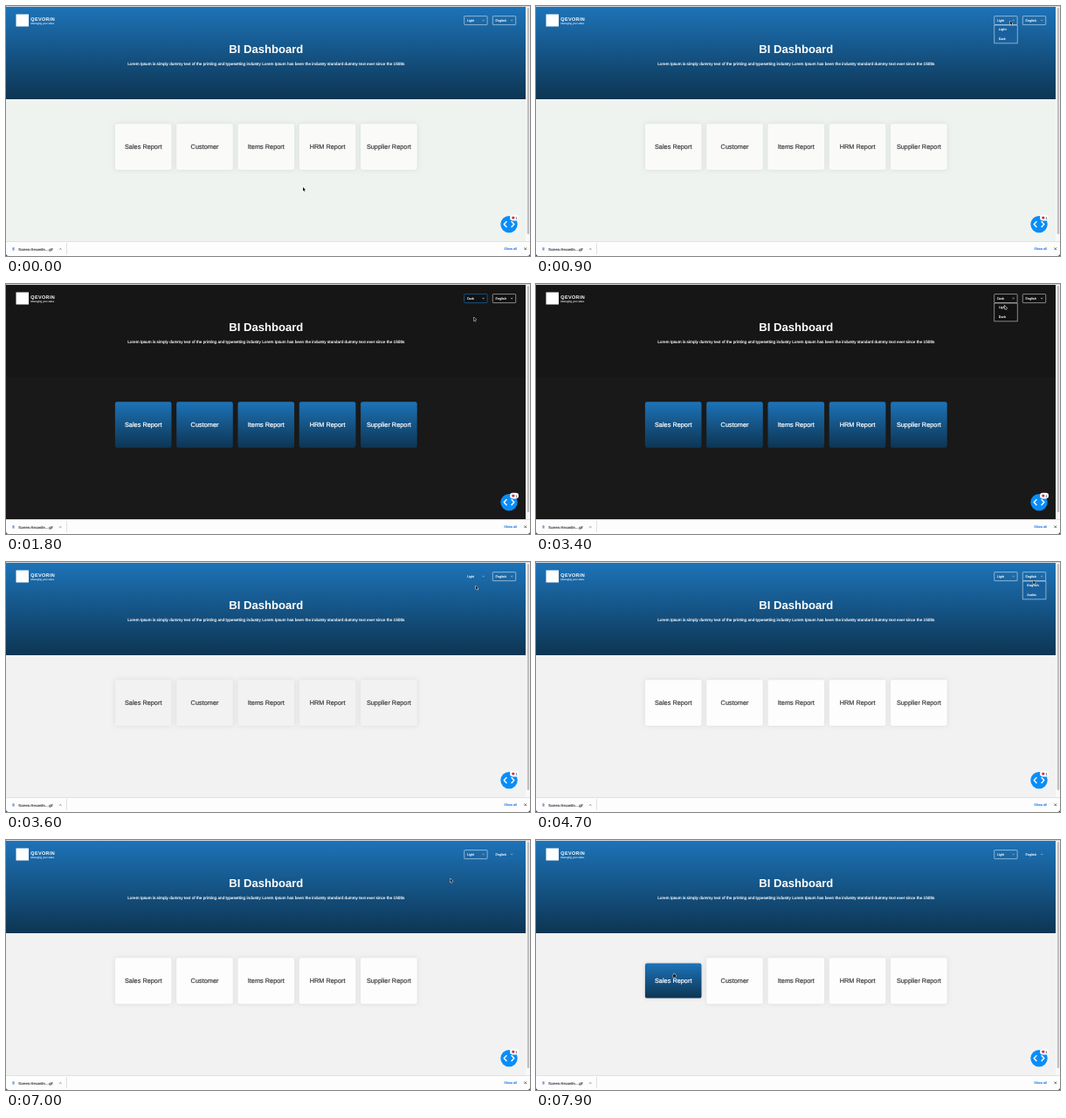
Animation, 600 px wide and 287 px high, one loop 8 s. Source, as an HTML page with a canvas:

```html
<!DOCTYPE html>
<html lang="en">
<head>
<meta charset="utf-8">
<title>BI Dashboard</title>
<style>
html, body { margin: 0; width: 100%; height: 100%; overflow: hidden; background: #fff; }
canvas { display: block; width: 600px; height: 287px; }
</style>
</head>
<body>
<canvas id="stage"></canvas>
<script>
const LOOP = 8000, STEP = 100;
const canvas = document.getElementById('stage');
const ctx = canvas.getContext('2d');
const ratio = window.devicePixelRatio || 1;
canvas.width = 600 * ratio;
canvas.height = 287 * ratio;

const LATIN = '"Liberation Sans", Arial, sans-serif';
const ARABIC = '"Noto Sans Arabic", "DejaVu Sans", sans-serif';

const words = {
  en: {
    title: 'BI Dashboard',
    sub: 'Lorem Ipsum is simply dummy text of the printing and typesetting industry Lorem Ipsum has been the industry standard dummy text ever since the 1500s',
    cards: ['Sales Report', 'Customer', 'Items Report', 'HRM Report', 'Supplier Report']
  },
  ar: {
    title: 'لوحة معلومات الأعمال',
    sub: 'لوريم إبسوم هو ببساطة نص شكلي في صناعة الطباعة والتنضيد ، كان لوريم إبسوم هو النص الوهمي القياسي في الصناعة منذ القرن الخامس عشر الميلادي',
    cards: ['تقرير المبيعات', 'تقرير العملاء', 'تقرير العنصر', 'تقرير الموظفين', 'تقرير الموردين']
  }
};

// Pointer stops: time, x, y; equal neighbours are rests.
const path = [
  [0, 340, 208], [400, 340, 208], [500, 431, 164], [800, 431, 164],
  [900, 543, 17], [1000, 543, 17], [1500, 535.5, 38], [2900, 535.5, 38],
  [3000, 539, 18], [3100, 539, 18], [3400, 536.5, 24.5], [3500, 536.5, 24.5],
  [3600, 538, 27], [3800, 538, 27], [4400, 570, 17], [4600, 570, 17],
  [5100, 566, 37.5], [5800, 566, 37.5], [6200, 571, 17],
  [6600, 567, 26], [6900, 567, 26], [7600, 158, 153], [LOOP, 158, 153]
];

const within = (t, from, to) => t >= from && t < to;

function pointer(t) {
  const i = Math.max(1, path.findIndex(p => p[0] >= t));
  const [t0, x0, y0] = path[i - 1], [t1, x1, y1] = path[i];
  const k = (t - t0) / (t1 - t0);
  return { x: x0 + (x1 - x0) * k, y: y0 + (y1 - y0) * k };
}

// A hairline stroke gives the type a slightly sturdier weight.
function text(str, x, y, size, color, align = 'left', weight = '', family = LATIN) {
  ctx.font = `${weight} ${size}px ${family}`;
  ctx.textAlign = align;
  ctx.direction = family === ARABIC ? 'rtl' : 'ltr';
  ctx.fillStyle = ctx.strokeStyle = color;
  ctx.fillText(str, x, y);
  if (weight) return;
  ctx.lineWidth = size * .03;
  ctx.strokeText(str, x, y);
}

function rect(x, y, w, h, color) {
  ctx.fillStyle = color;
  ctx.fillRect(x, y, w, h);
}

function line(points, color, width) {
  ctx.beginPath();
  points.forEach(([x, y]) => ctx.lineTo(x, y));
  ctx.strokeStyle = color;
  ctx.lineWidth = width;
  ctx.stroke();
}

function disc(x, y, r, color) {
  ctx.beginPath();
  ctx.arc(x, y, r, 0, Math.PI * 2);
  ctx.fillStyle = color;
  ctx.fill();
}

function blue(y0, y1) {
  const g = ctx.createLinearGradient(0, y0, 0, y1);
  g.addColorStop(0, '#1d73b8');
  g.addColorStop(1, '#0d3553');
  return g;
}

function rounded(x, y, w, h, r) {
  ctx.beginPath();
  ctx.roundRect(x, y, w, h, r);
}

function card(i, t, s) {
  const p = pointer(t), x = 124.9 + 70.3 * i;
  const hot = within(p.x, x, x + 64.6) && within(p.y, 135, 188);
  const h = hot ? 40 : 52.6, y = 161.6 - h / 2;
  const vivid = s.dark || hot;
  ctx.save();
  if (!s.dark) {
    ctx.shadowColor = 'rgba(0,0,0,.1)';
    ctx.shadowBlur = 5 * ratio;
  }
  rounded(x, y, 64.6, h, 2.2);
  ctx.fillStyle = vivid ? blue(y, y + h) : s.card;
  ctx.fill();
  ctx.restore();
  const ar = s.lang === 'ar';
  text(words[s.lang].cards[i], x + 32.3, ar ? 163.4 : 164.2, ar ? 6.4 : 7.35,
    vivid ? '#fff' : '#404244', 'center', '', ar ? ARABIC : LATIN);
}

function select(x, options, value, state, dark) {
  const open = state === 'open';
  const edge = state === 'focus' ? '#1d6cab' : 'rgba(255,255,255,.7)';
  rounded(x, 11.6, 26.4, 10, .8);
  if (dark) { ctx.fillStyle = '#111'; ctx.fill(); }
  ctx.strokeStyle = edge;
  ctx.lineWidth = .7;
  ctx.stroke();
  text(value, x + 3.2, 17.8, 3.75, '#fff');
  const cx = x + 21.9, d = open ? -.8 : .8;
  line([[cx - 1.2, 16.5 - d / 2], [cx, 16.5 + d / 2], [cx + 1.2, 16.5 - d / 2]],
    dark ? '#fff' : 'rgba(255,255,255,.7)', .6);
  if (!open) return;
  rect(x, 22, 26.6, 20.8, dark ? '#111' : '#19619d');
  ctx.strokeStyle = edge;
  ctx.lineWidth = .7;
  ctx.strokeRect(x, 22, 26.6, 20.8);
  options.forEach((o, i) =>
    text(o, x + 5, 28.4 + i * 10.3, 3.75, '#fff', 'left', o === value ? 'bold' : ''));
}

function header(s) {
  rect(0, 0, 595, 107, s.dark ? '#161616' : blue(1, 107));
  rect(11.5, 9.5, 14.5, 14, '#fff');
  ctx.letterSpacing = '.35px';
  text('QEVORIN', 28.3, 17, 5.5, '#fff', 'left', 'bold');
  ctx.letterSpacing = '0px';
  text('Managing your sales', 28.5, 21, 2.9, '#dce8f2');

  const w = words[s.lang];
  if (s.lang === 'ar') {
    text(w.title, 297.8, 51.7, 12.4, '#fff', 'center', '', ARABIC);
    text(w.sub, 297.6, 68, 4.17, '#fff', 'center', '', ARABIC);
  } else {
    text(w.title, 297.8, 53.8, 13.1, '#fff', 'center', 'bold');
    text(w.sub, 297.8, 68.1, 4.69, '#fff', 'center');
  }
}

function widget() {
  disc(576, 250.6, 9.7, '#0a8df8');
  line([[573.4, 247.2], [570.2, 250.6], [573.4, 254]], '#fff', 1.4);
  line([[578.6, 247.2], [581.8, 250.6], [578.6, 254]], '#fff', 1.4);
  rounded(577, 239.8, 10, 6.6, 3.3);
  ctx.fillStyle = '#fff';
  ctx.fill();
  disc(580.8, 243.1, 1.7, '#d8343c');
  text('1', 583.4, 244.6, 3.8, '#444');
}

function browser() {
  rect(595, 0, 5, 270, '#f8f8f8');
  rounded(596.8, 2, 2.4, 260, 1.2);
  ctx.fillStyle = '#bfbfc1';
  ctx.fill();
  rect(0, 0, 600, 1, '#d3d6da');

  rect(0, 270, 600, 17, '#fdfdfe');
  rect(0, 270, 600, .6, '#cfcfd2');
  rect(7.4, 277.2, 2.2, 3.4, '#7f9fd0');
  text('Screen-Recordin....gif', 14.3, 280.6, 4.05, '#303336');
  line([[60.9, 279.7], [62.2, 278.4], [63.5, 279.7]], '#555', .7);
  rect(69, 272, .6, 13, '#cfcfd2');
  text('Show all', 570.3, 280.2, 3.9, '#1a73e8');
  line([[593.4, 277.4], [596, 280]], '#333', .7);
  line([[596, 277.4], [593.4, 280]], '#333', .7);

  // Window corners
  ctx.beginPath();
  ctx.rect(0, 284, 600, 3);
  ctx.roundRect(0, 280, 600, 7, [0, 0, 3, 3]);
  ctx.rect(0, 280, 600, 4);
  ctx.fillStyle = '#2b2a4c';
  ctx.fill('evenodd');
}

function arrow(t) {
  const { x, y } = pointer(t);
  ctx.save();
  ctx.translate(x, y);
  if (t >= 7500) {
    rounded(-.5, 0, 1.2, 3.4, .6);
    ctx.roundRect(-1.4, 1.8, 3.4, 2.8, .9);
  } else {
    ctx.beginPath();
    [[0, 0], [0, 4.2], [1, 3.4], [1.7, 5], [2.4, 4.7], [1.8, 3.1], [3, 3]]
      .forEach(p => ctx.lineTo(...p));
    ctx.closePath();
  }
  ctx.strokeStyle = '#fff';
  ctx.lineWidth = .9;
  ctx.stroke();
  ctx.fillStyle = '#111';
  ctx.fill();
  ctx.restore();
}

function draw(t) {
  const dark = within(t, 1800, 3600);
  const s = {
    dark,
    lang: within(t, 5300, 6800) ? 'ar' : 'en',
    page: dark ? '#191919' : t < 1800 ? '#eff3ef' : '#f2f2f2',
    card: t < 1800 ? '#fafbf9' : t < 3700 ? '#f2f2f2' : '#fdfdfd'
  };
  const theme = within(t, 900, 1700) || within(t, 3000, 3600) ? 'open'
    : within(t, 1700, 3000) || within(t, 3600, 4400) ? 'focus' : '';
  const lang = within(t, 4400, 5300) || within(t, 6200, 6800) ? 'open'
    : t >= 5300 ? 'focus' : '';

  ctx.setTransform(ratio, 0, 0, ratio, 0, 0);
  ctx.textRendering = 'geometricPrecision';
  ctx.lineJoin = 'round';
  rect(0, 0, 600, 287, s.page);
  header(s);
  for (let i = 0; i < 5; i++) card(i, t, s);
  select(524.7, ['Light', 'Dark'], within(t, 1700, 3600) ? 'Dark' : 'Light', theme, dark);
  select(557.3, ['English', 'Arabic'], s.lang === 'ar' ? 'Arabic' : 'English', lang, dark);
  widget();
  browser();
  arrow(t);
}

const start = performance.now();
function tick() {
  const t = (performance.now() - start) % LOOP;
  draw(Math.floor(t / STEP) * STEP);
  requestAnimationFrame(tick);
}
tick();
</script>
</body>
</html>
```
